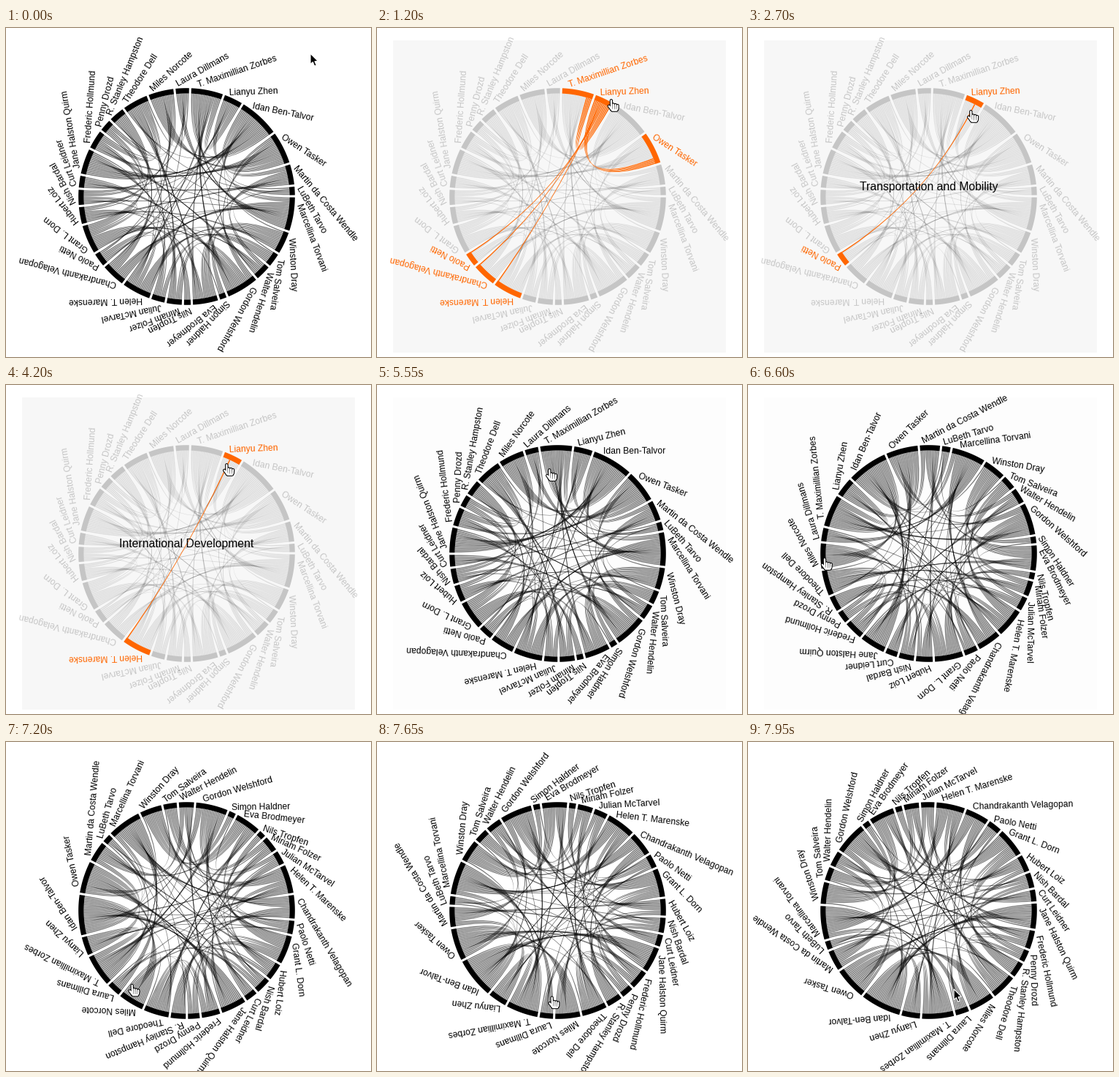
These frames come from a looping animation (500 px wide and 450 px high, 8 s). A matplotlib script:

```python
import random

import matplotlib.pyplot as plt
import numpy as np
from matplotlib.animation import FuncAnimation
from matplotlib.collections import PathCollection
from matplotlib.patches import PathPatch, Polygon, Rectangle
from matplotlib.path import Path
from matplotlib.transforms import Affine2D

W, H, DPI = 500, 450, 100
PX = 72 / DPI
CENTER = np.array([247.5, 230.5])
R_IN, R_OUT, R_TEXT = 141, 148.3, 150.5
FIRST, GAP, TILT = 31.8, 1.2, 25
STEP, TICK, LOOP = 150, 50, 8000
ORANGE = (1, 0.4, 0, 1)

# Label and number of link ends, clockwise
PEOPLE = {
    "Idan Ben-Talvor": 24, "Owen Tasker": 19, "Martin da Costa Wendle": 12,
    "LuBeth Tarvo": 5, "Marcellina Torvani": 20, "Winston Dray": 13,
    "Tom Salveira": 8, "Walter Hendelin": 9, "Gordon Welshford": 19,
    "Simon Haldner": 4, "Eva Brodmeyer": 15, "Nils Tropfen": 4,
    "Miriam Folzer": 9, "Julian McTarvel": 8, "Helen T. Marenske": 17,
    "Chandrakanth Velagopan": 14, "Paolo Netti": 8, "Grant L. Dorn": 17,
    "Hubert Loiz": 10, "Nish Bardal": 9, "Curt Leidner": 7,
    "Jane Halston Quirm": 15, "Frederic Hollmund": 11, "Penny Drozd": 7,
    "R. Stanley Hampston": 9, "Theodore Dell": 15, "Miles Norcote": 15,
    "Laura Dillmans": 8, "T. Maximillian Zorbes": 19, "Lianyu Zhen": 11,
}
N = len(PEOPLE)
TASKER, MARENSKE, VELAGOPAN, NETTI, ZORBES, HOVERED = 1, 14, 15, 16, 28, 29

counts = np.array(list(PEOPLE.values()))
widths = counts * (360 - N * GAP) / counts.sum()
starts = FIRST + np.cumsum(widths + GAP) - (widths + GAP)

TRANSPORT = "Transportation and Mobility"
DEVELOPMENT = "International Development"

# (from ms, linked people lit up, topic); None means nothing is hovered
STATES = [
    (0, None, ""),
    (900, {TASKER, MARENSKE, VELAGOPAN, NETTI, ZORBES}, ""),
    (2250, {NETTI}, TRANSPORT),
    (3600, {ZORBES}, TRANSPORT),
    (3900, {VELAGOPAN}, DEVELOPMENT),
    (4050, {MARENSKE}, DEVELOPMENT),
    (5100, None, ""),
]
GRAB, RELEASE = 5250, 7800
# time, x, y of the pointer while hovering
HOVER = np.array([(150, 417, 35), (1050, 322, 98), (2100, 312, 98),
                  (2700, 305, 113), (3450, 305, 113), (4200, 302, 108),
                  (4950, 302, 108), (GRAB, 261, 111)]).T
# time, turn of the wheel, pointer angle and radius while dragging
DRAG = np.array([(GRAB, 0, 6, 119), (5550, -11.8, -5.7, 116),
                 (6600, -77.5, -92.6, 143), (7200, -135, -143.4, 126),
                 (7950, -196, -197.8, 113)]).T


def polar(angle, radius):
    a = np.radians(angle)
    return np.column_stack([radius * np.sin(a), -radius * np.cos(a)])


def arc_path(start, width):
    angles = np.linspace(start, start + width, 24)
    return Path(np.vstack([polar(angles, R_OUT), polar(angles[::-1], R_IN)]))


def ribbon(a, b):
    """Band between two angle spans, both sides bent through the centre."""
    (a0, a1), (b0, b1) = polar(a, R_IN), polar(b, R_IN)
    mid = (0, 0)
    codes = [Path.MOVETO, Path.LINETO, Path.CURVE3, Path.CURVE3,
             Path.LINETO, Path.CURVE3, Path.CURVE3]
    return Path([a0, a1, mid, b0, b1, mid, a0], codes)


def make_links():
    """Random links filling each arc, with a few thick bundles."""
    rng = random.Random(12)
    free = [int(c) for c in counts]
    links = []

    def join(i, j, count):
        links.extend([(min(i, j), max(i, j))] * count)
        free[i] -= count
        free[j] -= count

    for j in (MARENSKE, VELAGOPAN, NETTI):
        join(j, HOVERED, 1)
    for j in (TASKER, ZORBES):
        join(j, HOVERED, 4)
    for i, j in ((0, 26), (1, 26), (1, 21), (0, 21), (4, 15), (8, 28)):
        join(i, j, 4)
    while True:
        i = max(range(N), key=lambda k: free[k])
        others = [k for k in range(N) if abs(k - i) > 1 and free[k] > 0]
        if not others or free[i] <= 0:
            break
        j = rng.choices(others, [free[k] for k in others])[0]
        join(i, j, min(rng.choice((1, 1, 2, 3)), free[i], free[j]))
    return sorted(links, key=lambda p: (p[1], p[0]))


def make_ribbons(links):
    """Give every link a slot on both arcs, ordered by partner."""
    slots = {}
    for i in range(N):
        ends = [(a + b - i, k) for k, (a, b) in enumerate(links) if i in (a, b)]
        size = widths[i] / len(ends)
        for n, (_, k) in enumerate(sorted(ends)):
            slots[i, k] = starts[i] + size * np.array([n + 0.15, n + 0.85])
    return [ribbon(slots[a, k], slots[b, k]) for k, (a, b) in enumerate(links)]


def hand_path():
    """Centre lines of four fingers, a thumb and the palm."""
    tops = (1.2, 6.5, 7, 8)
    lines = [[(0.3 + 2.9 * k, top), (0.6 + 2.7 * k, 13)]
             for k, top in enumerate(tops)]
    lines += [[(-2.8, 8.8), (1.2, 14)], [(1.6, 14.6), (7.8, 14.6)]]
    return Path(np.vstack(lines), [Path.MOVETO, Path.LINETO] * len(lines))


plt.rcParams["font.family"] = "Liberation Sans"
fig = plt.figure(figsize=(W / DPI, H / DPI), dpi=DPI, facecolor="white")
ax = fig.add_axes([0, 0, 1, 1])
ax.set_xlim(0, W)
ax.set_ylim(H, 0)
ax.axis("off")

links = make_links()
panel = ax.add_patch(Rectangle((22, 17), 456, 427, lw=0, zorder=0))
chords = PathCollection(make_ribbons(links), linewidths=0, zorder=1)
arcs = PathCollection([arc_path(s, w) for s, w in zip(starts, widths)],
                      linewidths=0, zorder=2)
for group in (chords, arcs):
    ax.add_collection(group, autolim=False)

labels = [ax.text(0, 0, name, fontsize=12.1 * PX, ha="left", va="baseline",
                  rotation_mode="anchor", zorder=3) for name in PEOPLE]
label_angles = starts + 0.22 * widths
topic_text = ax.text(CENTER[0], 222, "", fontsize=15.8 * PX, ha="center",
                     va="baseline", zorder=4)

arrow = ax.add_patch(Polygon(
    [(0, 0), (0, 14.5), (3.3, 11.5), (5.6, 17), (8.2, 16), (5.9, 10.6),
     (10.3, 10.3)], fc="black", ec="white", lw=0.8, zorder=6))
hand = [ax.add_patch(PathPatch(hand_path(), fill=False, ec=color, lw=width * PX,
                               capstyle="round", zorder=6))
        for color, width in (("black", 4.4), ("white", 2.3))]


def at(keys, t):
    return [np.interp(t, keys[0], row) for row in keys[1:]]


def set_pointer(t, angle, radius):
    spot = at(HOVER, t) if t < GRAB else polar(angle, radius)[0] + CENTER
    move = Affine2D().translate(*spot) + ax.transData
    gripping = 900 <= t < RELEASE
    for part in (arrow, *hand):
        part.set_transform(move)
        part.set_visible(gripping != (part is arrow))


def set_colors(lit, topic, t):
    base = 1 if lit is None else 0.2
    arc_colors = [(0, 0, 0, base)] * N
    chord_colors = [(0, 0, 0, 0.53 * base)] * len(links)
    if lit is not None:
        for i in lit | {HOVERED}:
            arc_colors[i] = ORANGE
        for k, (a, b) in enumerate(links):
            if b == HOVERED and a in lit:
                chord_colors[k] = ORANGE
    arcs.set_facecolor(arc_colors)
    chords.set_facecolor(chord_colors)
    for label, color in zip(labels, arc_colors):
        label.set_color(color)
    topic_text.set_text(topic)
    panel.set_facecolor("0.97" if lit is not None else "0.992")
    panel.set_visible(lit is not None or 5100 <= t < 7050)


def set_spin(turn):
    place = Affine2D().rotate_deg(turn).translate(*CENTER) + ax.transData
    arcs.set_transform(place)
    chords.set_transform(place)
    angles = label_angles + turn
    for label, spot, a in zip(labels, polar(angles, R_TEXT) + CENTER, angles):
        label.set_position(spot)
        label.set_rotation((TILT - a) % 360)


def draw(frame):
    t = frame * TICK // STEP * STEP
    _, lit, topic = [s for s in STATES if s[0] <= t][-1]
    turn, angle, radius = at(DRAG, t)
    set_colors(lit, topic, t)
    set_spin(turn)
    set_pointer(t, angle, radius)
    return []


anim = FuncAnimation(fig, draw, frames=LOOP // TICK, interval=TICK,
                     init_func=lambda: draw(0), repeat=True,
                     cache_frame_data=False)
plt.show()
```
